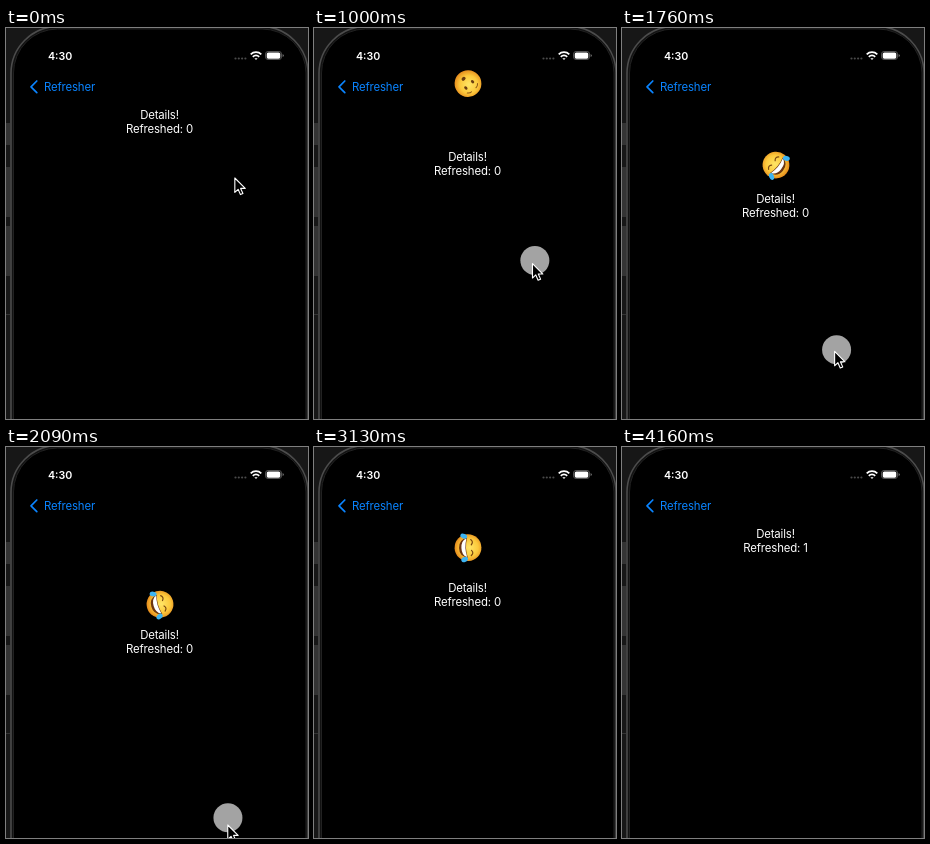
An HTML page that plays this animation: 302 by 391 pixels, repeating every 5090 ms.

```html
<!DOCTYPE html>
<html lang="en">
<head>
<meta charset="utf-8">
<style>
  html, body { margin: 0; width: 100%; height: 100%; overflow: hidden; background: #000; }
  svg { display: block; width: 302px; height: 391px; }
  text { font: 400 11.4px Inter, "Liberation Sans", sans-serif; letter-spacing: -.15px; fill: #fff; }
  .clock { font-size: 10.7px; font-weight: 600; letter-spacing: 0; }
  .middle { text-anchor: middle; }
  .line { fill: none; stroke-linecap: round; stroke-linejoin: round; }
</style>
</head>
<body>
<svg viewBox="0 0 302 391">
  <defs>
    <radialGradient id="skin" cx=".5" cy=".45" r=".55">
      <stop offset="0" stop-color="#ffe566"/>
      <stop offset=".6" stop-color="#fcc93c"/>
      <stop offset="1" stop-color="#e58a1c"/>
    </radialGradient>
  </defs>

  <!-- phone body -->
  <rect width="302" height="391" fill="#171717"/>
  <g fill="#343434">
    <rect y="95" width="4" height="22"/>
    <rect y="139" width="4" height="50"/>
    <rect y="198" width="4" height="50"/>
    <rect y="286" width="4" height="1"/>
  </g>
  <rect x="5" y="-1.5" width="297" height="460" rx="47" fill="#121212" stroke="#4c4c4c" stroke-width="1.6"/>
  <rect x="7.5" y="1" width="292.5" height="450" rx="44" fill="#000" stroke="#222"/>

  <!-- status bar -->
  <text class="clock" x="42" y="31.7">4:30</text>
  <path class="line" d="M229.5 30.5h10" stroke="#4a4a4a" stroke-width="2.2" stroke-dasharray="0 3.3"/>
  <g fill="none" stroke="#fff" stroke-width="1.7">
    <path d="M244.7 26.4a7.4 7.4 0 0 1 10.6 0M246.8 28.8a4.5 4.5 0 0 1 6.4 0"/>
    <path d="M248.4 30.3h3.2l-1.6 1.7z" fill="#fff" stroke="none"/>
  </g>
  <rect x="259.5" y="23.5" width="16" height="8" rx="2.6" fill="none" stroke="#555"/>
  <rect x="260.7" y="24.5" width="13.6" height="6.2" rx="1.6" fill="#fff"/>
  <path d="M276.6 26v3q1.2-.5 1.2-1.5t-1.2-1.5" fill="#777"/>

  <!-- navigation bar -->
  <path class="line" d="M30.8 53l-5.8 5.8 5.8 5.8" stroke="#0a84ff" stroke-width="1.7"/>
  <text x="38" y="63" style="fill:#0a84ff">Refresher</text>

  <g id="content">
    <text class="middle" x="153.5" y="91">Details!</text>
    <text class="middle" x="153.5" y="105" id="count"></text>
  </g>

  <g id="emoji">
    <circle r="13.4" fill="url(#skin)"/>
    <g id="hushed" fill="#6b3d10">
      <ellipse cx="-4.6" cy="-1.8" rx="1.4" ry="1.9"/>
      <ellipse cx="4.6" cy="-1.8" rx="1.4" ry="1.9"/>
      <ellipse cy="6.5" rx="2.2" ry="1.8"/>
      <path class="line" d="M-7-6.5q2-2.3 4-2M7-6.5q-2-2.3-4-2" stroke="#8a5417"/>
    </g>
    <g id="laughing">
      <path d="M-10 .5Q0 3.5 10 .5Q8.5 9 0 9T-10 .5z" fill="#6b3510"/>
      <path d="M-9.3 1.2Q0 4 9.3 1.2Q7.5 6.6 0 6.6T-9.3 1.2z" fill="#fff"/>
      <path class="line" d="M-8-3q2.5-3 5.2-.4M8-3q-2.5-3-5.2-.4" stroke="#7a4712" stroke-width="1.2"/>
      <g fill="#3db4f2">
        <ellipse cx="-11.7" cy="3.8" rx="2.4" ry="3.5" transform="rotate(25 -11.7 3.8)"/>
        <ellipse cx="11.7" cy="3.8" rx="2.4" ry="3.5" transform="rotate(-25 11.7 3.8)"/>
      </g>
    </g>
  </g>

  <circle id="touch" r="14.5" fill="#a3a3a3"/>
  <path id="cursor" d="M0 0V14.4L3.3 11.3 5.6 16.6 8.1 15.5 5.8 10.4H10.4z"
        fill="#000" stroke="#fff" stroke-width="1.1" stroke-linejoin="round"/>
</svg>

<script>
const LOOP = 5090, STEP = 57.7;
const PRESS = 360, TRIGGER = 1360, RELEASE = 2160, COUNTED = 3650, DONE = 3715;
const REST = 53.5;  // scroll offset held while refreshing

// Key points of the pointer's way: time, x, y.
const way = [[0, 229, 151], [120, 227, 139], [PRESS, 227, 139], [650, 225, 180],
  [1330, 212, 291], [1990, 213, 343], [2090, 222, 379], [RELEASE, 231, 405]];

const clamp = (v, low, high) => Math.min(high, Math.max(low, v));
const mix = (a, b, k) => a + (b - a) * k;

// Critically damped spring falling from 1 to 0.
function settle(elapsed, tau) {
  const x = Math.max(0, elapsed) / tau;
  return (1 + x) * Math.exp(-x);
}

function pointer(t) {
  const next = clamp(way.findIndex(key => key[0] > t), 1, way.length - 1);
  const [t0, x0, y0] = way[next - 1], [t1, x1, y1] = way[next];
  const k = clamp((t - t0) / (t1 - t0), 0, 1);
  return [mix(x0, x1, k), mix(y0, y1, k)];
}

// The content follows the drag at about half speed, then springs back.
function scrollOffset(t) {
  const pulled = clamp(.485 * (pointer(t)[1] - 150), 0, 101);
  if (t < PRESS) return 0;
  if (t < RELEASE) return pulled;
  return mix(REST, 101, settle(t - RELEASE, 75)) * settle(t - DONE, 60);
}

const el = id => document.getElementById(id);
const place = (id, x, y, angle = 0) =>
  el(id).setAttribute("transform", `translate(${x} ${y}) rotate(${angle})`);
const show = (id, on) => el(id).style.display = on ? "" : "none";

function draw(now) {
  const t = Math.floor(now % LOOP / STEP) * STEP + 10;
  const offset = scrollOffset(t);
  const refreshing = t >= TRIGGER;

  place("content", 0, offset);
  el("count").textContent = "Refreshed: " + (t < COUNTED ? 0 : 1);

  // Pulling turns the face; refreshing drops it lower and spins it once per second.
  const y = mix(37 + 1.19 * offset, 14 + offset, settle(t - TRIGGER, 40));
  place("emoji", 154, y, refreshing ? .36 * (t - 1743) - 50 : offset * 3.3);
  el("emoji").style.opacity = refreshing ? clamp((offset - 18) / 34, 0, 1) : +(offset > 31);
  show("hushed", !refreshing);
  show("laughing", refreshing);

  const [x, tip] = pointer(t), [touchX, touchY] = pointer(t - 20);
  place("cursor", x, tip);
  place("touch", touchX + 2, touchY);
  show("cursor", t < RELEASE);
  show("touch", t >= PRESS && t < RELEASE);
}

const start = performance.now();
function tick() {
  draw(performance.now() - start);
  requestAnimationFrame(tick);
}
tick();
</script>
</body>
</html>
```
